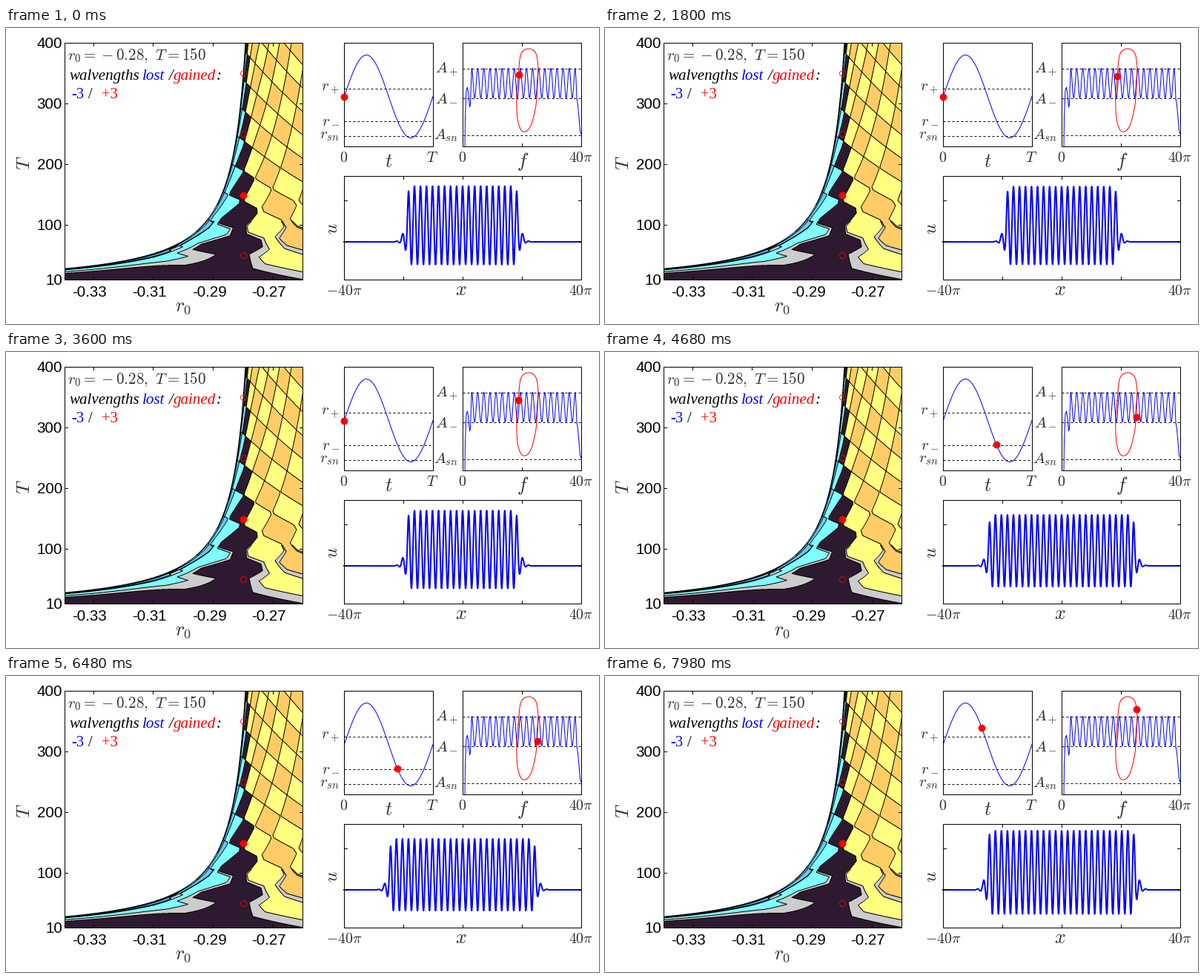
Animation, 800 px wide and 400 px high, one loop 8 s. Source, as a matplotlib script:

```python
import numpy as np
import matplotlib.pyplot as plt
from matplotlib.animation import FuncAnimation

plt.rcParams["mathtext.fontset"] = "cm"
PX = 0.72  # points per pixel at 100 dpi
BLUE, RED, INK = "#0000ff", "#ff0000", "#303030"

fig = plt.figure(figsize=(8, 4), dpi=100, facecolor="white")
ax = fig.add_axes([0, 0, 1, 1])
ax.axis("off")


def text(x, y, s, size=20, color=INK, ha="center", **kw):
    kw.setdefault("va", "baseline")
    ax.text(x, y, s, fontsize=size * PX, color=color, ha=ha, **kw)


def line(x, y, color="black", width=1.0, **kw):
    return ax.plot(x, y, color=color, lw=width * PX, **kw)[0]


def dot(x, y, size=9, face=RED):
    return ax.plot([x], [y], "o", ms=size * PX, mfc=face, mec=RED,
                   mew=0.8 * PX, zorder=6)[0]


def frame(x0, y0, x1, y1, xticks=(), yticks=(), tick=4):
    line([x0, x1, x1, x0, x0], [y0, y0, y1, y1, y0], zorder=4)
    for x in xticks:
        line([x, x], [y0, y0 + tick], zorder=4)
        line([x, x], [y1, y1 - tick], zorder=4)
    for y in yticks:
        line([x0, x0 + tick], [y, y], zorder=4)
        line([x1, x1 - tick], [y, y], zorder=4)


# ---- resonance map ----
def stairs(v, w):
    v = np.maximum(v, 0)
    n = np.floor(v)
    return n + np.clip((v - n - 0.5) / w + 0.5, 0, 1)


def resonance_map(size=320, sub=3):
    p = (np.arange(size * sub) + 0.5) / sub
    xi = ((p + 80 - 319.5) / 40.4)[None, :]
    T = (10 + (size - p) * 390 / size)[:, None]
    left, right = np.minimum(xi, 0), np.maximum(xi, 0)

    # time spent beyond the saddle-node sets the collapse boundary
    th = np.linspace(-np.pi, np.pi, 1201)[:, None]
    depth = -0.3744 - (-0.28 + xi / 100) + 0.1 * np.cos(th)
    J = np.sqrt(np.clip(depth, 0, None)).mean(axis=0)[None, :]
    u = T * J / 2.15

    gain = 0.02 * T * np.exp(0.13 * xi - 0.03 * left ** 2)
    gain = gain - 0.3 + 0.18 * right
    loss = 0.0188 * T * np.exp(-0.1 * xi - 0.3 * right - 0.13 * xi ** 2)
    loss = loss - 0.3 - 0.85 * np.log(np.maximum(1 - u ** 2, 0.02))

    w = np.maximum(0.7 * np.exp(-(T / 140) ** 2), 1e-3)
    F = stairs(gain, w) - stairs(loss, w)
    net = np.rint(F).astype(int)
    g = 0.24 * np.exp(-(T / 85) ** 2)
    grey = (0.5 - np.abs(F - net) < g) & (g > 0.05)
    ids = np.where(grey, 50, net)
    ids = np.where(u >= 1, 99, ids)

    rgb = np.full(ids.shape + (3,), 255.0)
    odd = ids % 2 == 1
    for mask, color in (
        (ids == 0, (46, 26, 48)),
        ((ids > 0) & odd, (255, 255, 128)),
        ((ids > 0) & ~odd, (255, 204, 102)),
        ((ids < 0) & odd, (128, 255, 255)),
        ((ids < 0) & ~odd, (102, 200, 255)),
        (ids == 50, (204, 204, 204)),
        (ids == 99, (255, 255, 255)),
    ):
        rgb[mask] = color

    edge = np.zeros(ids.shape, bool)
    dv, dh = ids[1:] != ids[:-1], ids[:, 1:] != ids[:, :-1]
    edge[1:] |= dv
    edge[:-1] |= dv
    edge[:, 1:] |= dh
    edge[:, :-1] |= dh
    wide = edge.copy()
    wide[1:] |= edge[:-1]
    wide[:, 1:] |= edge[:, :-1]
    rgb[wide] = 0
    rgb = rgb.reshape(size, sub, size, sub, 3).mean(axis=(1, 3))
    return rgb.astype(np.uint8)


ax.imshow(resonance_map(), extent=(80, 400, 340, 20), aspect="auto",
          interpolation="nearest", zorder=1)

xt = {r: 319.5 + (r + 0.28) * 4040 for r in (-0.33, -0.31, -0.29, -0.27)}
yt = {T: 340 - (T - 10) * 320 / 390 for T in (10, 100, 200, 300, 400)}
frame(79, 20, 400, 340, xt.values(), yt.values())
for r, x in xt.items():
    text(x - 5, 363, f"{r:.2f}", 20.5, "black", family="Liberation Sans")
for T, y in yt.items():
    text(76, y + 7, str(T), 20.5, "black", "right", family="Liberation Sans")
text(25, 182, "$T$", 25, va="center", rotation=90)
text(239, 383, "$r_0$", 26)
text(83, 43, "$r_0=-0.28,\\ T=150$", 21, ha="left")

for x, s, color in ((85, "walvengths", "black"), (184, "lost", BLUE),
                    (220, "/", "black"), (226, "gained", RED),
                    (284, ":", "black")):
    text(x, 70, s, 21, color, "left", family="Liberation Serif",
         style="italic")
for x, s, color in ((88, "-3", BLUE), (111, "/", "black"), (129, "+3", RED)):
    text(x, 95, s, 20.5, color, "left", family="Liberation Serif")

dot(319.5, 225.5)
for T in (50, 250, 350):
    dot(319.5, 340 - (T - 10) * 320 / 390, 8, "none")


# ---- forcing panel ----
def forcing(ph):
    return 456.3 + 119.7 * ph, 92.5 - 56 * np.sin(2 * np.pi * ph)


def levels(x0, x1, rows):
    for y, base, s in rows:
        line([x0, x1], [y, y], width=1, dashes=(3, 3), zorder=2)
        text(x0 - 6, base, s, 21, ha="right")


frame(456, 20, 576, 160)
levels(456, 576, ((81.5, 85, "$r_+$"), (125.5, 129.5, "$r_-$"),
                  (145.5, 149, "$r_{sn}$")))
line(*forcing(np.linspace(0, 1, 200)), BLUE, zorder=3)
text(456, 181, "$0$")
text(516, 188, "$t$", 26)
text(575, 181, "$T$")

# ---- snaking panel ----
LOOP = np.array([
    (691, 65.5), (692, 53), (693, 43), (694.5, 36), (697, 31.5),
    (701, 28.8), (706, 28), (711, 29.8), (715.5, 36), (717.7, 49.5),
    (717.8, 60), (717.3, 73), (716.5, 88), (715, 104), (712, 119),
    (708, 132), (702, 139.5), (695, 138), (690, 122), (688.8, 93)])


def orbit(ph):
    """Closed Catmull-Rom curve through LOOP, one turn per unit phase."""
    s = np.atleast_1d(ph) * len(LOOP)
    i = np.floor(s + 1e-9).astype(int)
    t = (s - i)[:, None]
    a, b, c, d = (LOOP[(i + j) % len(LOOP)] for j in (-1, 0, 1, 2))
    q = 2 * b + (c - a) * t + (2 * a - 5 * b + 4 * c - d) * t ** 2
    return 0.5 * (q + (3 * b - a - 3 * c + d) * t ** 3)


frame(616, 20, 776, 160, xticks=(696,))
levels(616, 776, ((54.5, 61, "$A_+$"), (94.5, 100, "$A_-$"),
                  (144.5, 150, "$A_{sn}$")))
sx = np.linspace(628.2, 768, 900)
sy = 74.5 - 20 * np.cos(2 * np.pi * (sx - sx[0]) * 17 / (sx[-1] - sx[0]))
line(np.r_[619, 619.5, 621, 622.5, 624, 625.5, 626.5, 627.5, sx,
           769, 770, 771.5, 773, 774.5, 776],
     np.r_[160, 120, 84, 80, 90, 107, 103, 75, sy,
           70, 95, 104, 122, 139, 143.5], BLUE, zorder=3)
line(*orbit(np.linspace(0, 1, 240)).T, RED, zorder=3)
text(616, 181, "$0$")
text(697, 188, "$f$", 26)
text(776, 181, "$40\\pi$")

# ---- profile panel ----
frame(456, 200, 776, 340, (536, 616, 696), (233, 289))
text(456, 361, "$-40\\pi$")
text(614, 361, "$x$", 26)
text(776, 361, "$40\\pi$")
text(440, 271, "$u$", 25, va="center", rotation=90)

GRID = np.linspace(456, 776, 1600)
WAVE = 8.12


def smooth(t):
    t = np.clip(t + 0.5, 0, 1)
    return t * t * (3 - 2 * t)


def profile(ph, level):
    """Localized pattern; wavelengths join and leave one by one per side."""
    steps = sum(smooth((ph - c) / 0.07) for c in (0.19, 0.28, 0.37))
    steps -= sum(smooth((ph - c) / 0.07) for c in (0.72, 0.80, 0.88))
    half = 75.3 + WAVE * steps + np.sin(2 * np.pi * ph)
    x = GRID - 616
    d = np.abs(x) - half
    env = 1 / (1 + np.exp(np.clip(np.where(d < 0, d, d / 3.2), -40, 40)))
    top = (80 - 0.256 * (level - 45)) / 76
    return 289 - top * env * (22.5 + 53.5 * np.cos(2 * np.pi * x / WAVE))


wave = line(GRID, GRID * 0 + 289, BLUE, 2, zorder=3)
clock = dot(456.3, 92.5)
state = dot(691, 65.5)
ax.set_xlim(0, 800)
ax.set_ylim(400, 0)


def update(n):
    k = n // 3
    ph = k % 30 / 30
    x, y = orbit(ph)[0]
    settle = np.exp(-k / 10)
    x, y = x + settle, y - 2.5 * settle
    tx, ty = forcing(ph)
    clock.set_data([tx], [ty])
    state.set_data([x], [y])
    wave.set_ydata(profile(ph, y))
    return wave, clock, state


anim = FuncAnimation(fig, update, frames=400, interval=20, repeat=True,
                     repeat_delay=0, blit=False, cache_frame_data=False)
plt.show()
```
